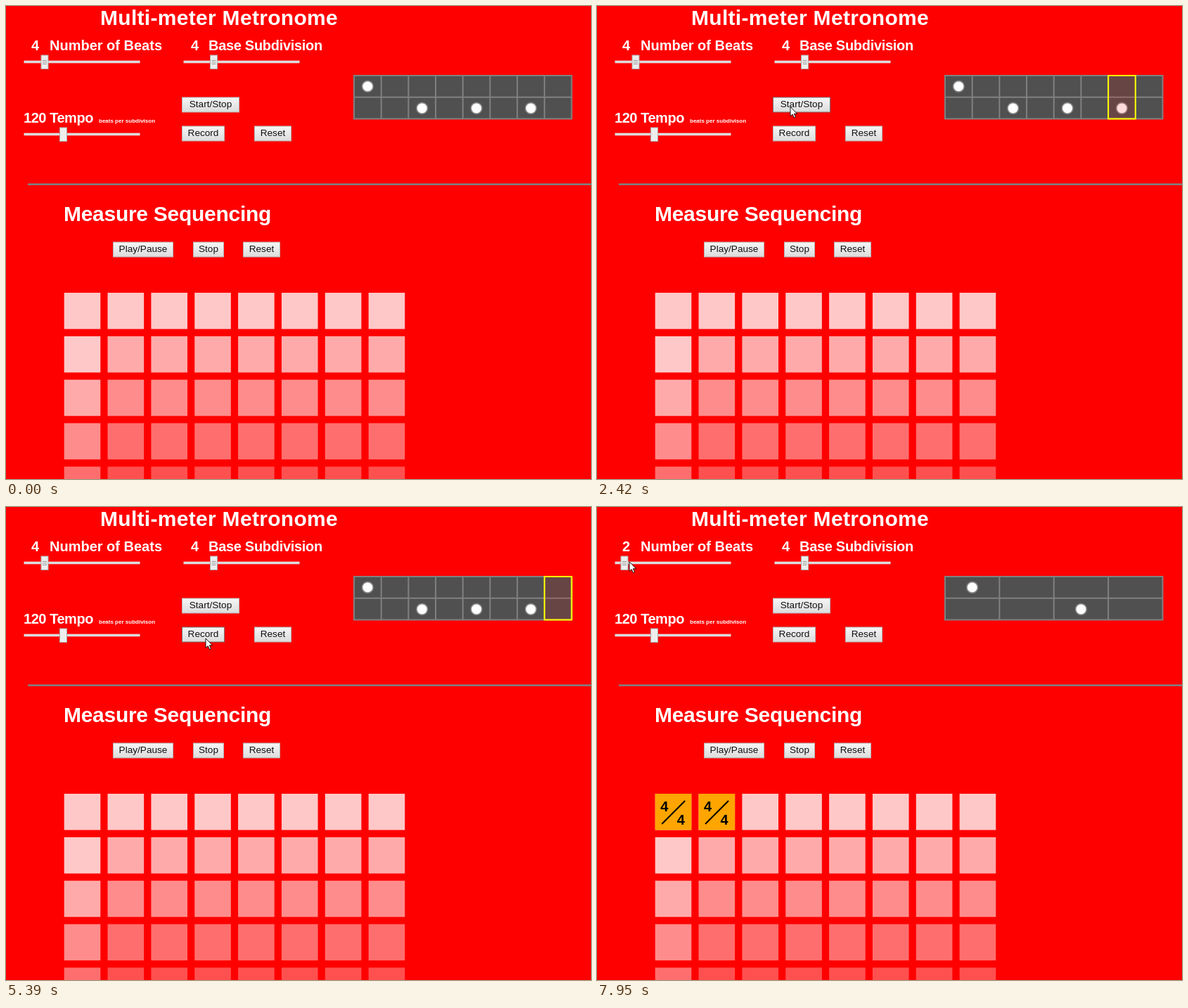
Write an HTML page that moves like this. It is 832 px wide and 673 px high and loops after 8000 ms.

```html
<!DOCTYPE html>
<html lang="en">
<head>
<meta charset="utf-8">
<title>Multi-meter Metronome</title>
<style>
  html, body { margin: 0; width: 100%; height: 100%; overflow: hidden; background: #f00; }
  svg { display: block; width: 832px; height: 673px; }
  text { font-family: "Liberation Sans", Arial, sans-serif; white-space: pre; }
  .head { font-weight: bold; fill: #fff; }
  .btn rect { fill: url(#face); stroke: #b4b4b4; }
  .btn.hover rect { stroke: #777; }
  .btn text { font-size: 13.6px; text-anchor: middle; fill: #111; }
</style>
</head>
<body>
<svg id="stage" viewBox="0 0 832 673">
  <defs>
    <linearGradient id="face" x2="0" y2="1">
      <stop stop-color="#f6f6f6"/><stop offset="1" stop-color="#dcdcdc"/>
    </linearGradient>
  </defs>
</svg>
<script>
const LOOP = 8000;
const stage = document.getElementById('stage');

function add(tag, attrs, parent = stage) {
  const el = document.createElementNS('http://www.w3.org/2000/svg', tag);
  for (const key in attrs) el.setAttribute(key, attrs[key]);
  parent.append(el);
  return el;
}

function rect(x, y, width, height, fill, parent) {
  return add('rect', { x, y, width, height, fill }, parent);
}

function label(str, x, y, size, spacing = 0, parent = stage) {
  const el = add('text', { class: 'head', x, y, 'font-size': size, 'letter-spacing': spacing }, parent);
  el.textContent = str;
  return el;
}

function button(str, x, y, w) {
  const g = add('g', { class: 'btn' });
  add('rect', { x: x + .5, y: y + .5, width: w - 1, height: 21 }, g);
  add('text', { x: x + w / 2, y: y + 14.6 }, g).textContent = str;
  return { g, x, y, w };
}

// Returns the handle, drawn around x = 0 so it can be moved by a transform.
function slider(x, y, pos, grip) {
  rect(x, y - 1.8, 165, 3.6, '#ddd');
  const g = add('g', { transform: `translate(${pos} ${y})` });
  add('rect', { x: -5, y: -9.5, width: 10, height: 19.5, fill: '#eee', stroke: '#aaa' }, g);
  if (grip) for (const dy of [-2.5, 0, 2.5]) rect(-3, dy, 6, 1, '#999', g);
  return g;
}

rect(0, 0, 832, 673, '#f00');
label('Multi-meter Metronome', 134, 27, 30, .3);
const beatText = label('4', 36, 63, 20);
label('Number of Beats', 62, 63, 20);
label('4', 263, 63, 20);
label('Base Subdivision', 288, 63, 20, -.3);
label('120 Tempo', 25, 166, 20, -.45);
label('beats per subdivison', 132, 165.5, 8);
label('Measure Sequencing', 82, 305.5, 30, -.28);

const beatHandle = slider(25.5, 79.5, 55, true);
slider(252.5, 79.5, 295.5, true);
slider(25.5, 182.5, 81.5, false);

const buttons = [
  button('Start/Stop', 250, 129.5, 82),
  button('Record', 250, 170.5, 61),
  button('Reset', 353, 170.5, 53),
  button('Play/Pause', 152, 335.5, 86),
  button('Stop', 266, 335.5, 44),
  button('Reset', 337, 335.5, 53)
];

rect(31, 252.4, 801, 2.6, '#808080');

// Sequencer squares fade toward red, one shade per eight squares.
const SQ = 51.6, PITCH = 61.85;
for (let i = 0; i < 40; i++) {
  const shade = 200 - 30 * Math.max(0, Math.floor((i - 1) / 8));
  rect(82.7 + i % 8 * PITCH, 408 + Math.floor(i / 8) * PITCH, SQ, SQ, `rgb(255,${shade},${shade})`);
}

function measure(i) {
  const g = add('g', { transform: `translate(${82.7 + i * PITCH} 408)` });
  rect(0, 0, SQ, SQ, '#ffa500', g);
  add('path', { d: 'M9.5 43L42.5 10', stroke: '#000', 'stroke-width': 2 }, g);
  for (const [x, y] of [[7.5, 25], [31, 43.5]]) label('4', x, y, 20, 0, g).style.fill = '#000';
  return g;
}
const recorded = [measure(0), measure(1)];

const GX = 495, GY = 99, GW = 309.5, GH = 61.5;
function beatGrid(beats) {
  const g = add('g', {});
  const cols = beats * 2, cw = GW / cols;
  add('rect', { x: GX, y: GY, width: GW, height: GH, fill: '#505050', stroke: '#808080', 'stroke-width': 2 }, g);
  let d = `M${GX} ${GY + GH / 2}h${GW}`;
  for (let c = 1; c < cols; c++) d += `M${GX + c * cw} ${GY}v${GH}`;
  add('path', { d, stroke: '#808080', 'stroke-width': 2 }, g);
  for (let b = 0; b < beats; b++) {
    add('circle', {
      cx: GX + (2 * b + .5) * cw, cy: GY + GH * (b ? .755 : .25), r: 7.8,
      fill: '#fff', stroke: '#888', 'stroke-width': 1.6
    }, g);
  }
  return g;
}
const grids = { 2: beatGrid(2), 3: beatGrid(3), 4: beatGrid(4) };
const column = add('rect', {
  y: GY, width: GW / 8, height: GH, fill: 'rgba(255,0,0,.137)', stroke: '#ff0', 'stroke-width': 2
});

const spot = add('circle', { r: 10, fill: 'rgba(230,220,30,.7)' });
const pointer = add('path', {
  d: 'M0 0V13.5L3.2 10.6L5.3 15.6L7.5 14.7L5.4 9.8H9.6Z',
  fill: '#fff', stroke: '#000', 'stroke-width': .9
});

// Pointer legs: first step, last step, number of steps, end point.
const legs = [
  [310, 420, 2, 330, 74], [530, 640, 2, 274, 131],
  [1750, 1980, 3, 275, 143.5], [5060, 5280, 3, 284, 187],
  [6060, 6290, 3, 186, 134], [6400, 6730, 4, 26, 58],
  [6850, 6960, 2, 54, 75], [7070, 7630, 6, 39, 74], [7730, 7950, 3, 46, 78]
];
const presses = [[860, 1300], [4730, 4950], [5510, 5730], [5950, 6060], [6960, 7730]];
const ticks = [970, 1190, 1420, 1640, 1860, 2200, 2420, 2640,
  2860, 3080, 3310, 3620, 3840, 4060, 4290, 4510];

function pointerAt(t) {
  let x = 446, y = 317;
  for (const [from, to, n, ex, ey] of legs) {
    if (t < from) break;
    const gap = (to - from) / (n - 1);
    const p = Math.min(n, Math.floor((t - from + 5) / gap) + 1) / n;
    x += (ex - x) * p;
    y += (ey - y) * p;
  }
  return [x, y];
}

const show = (el, on) => el.setAttribute('visibility', on ? 'visible' : 'hidden');

function draw(t) {
  const [x, y] = pointerAt(t);
  show(pointer, t >= 200);
  pointer.setAttribute('transform', `translate(${x} ${y})`);
  show(spot, presses.some(([a, b]) => t >= a && t < b));
  spot.setAttribute('cx', x);
  spot.setAttribute('cy', y);
  for (const b of buttons) {
    const over = t >= 200 && x >= b.x && x <= b.x + b.w && y >= b.y && y <= b.y + 22;
    b.g.classList.toggle('hover', over);
  }

  const beats = t < 7180 ? 4 : t < 7410 ? 3 : 2;
  beatText.textContent = beats;
  beatHandle.setAttribute('transform', `translate(${23 + beats * 8} 79.5)`);
  for (const n in grids) show(grids[n], +n === beats);

  const tick = ticks.filter(at => at <= t).length - 1;
  show(column, tick >= 0 && beats === 4);
  column.setAttribute('x', GX + Math.max(0, tick) % 8 * GW / 8);

  show(recorded[0], t >= 5510);
  show(recorded[1], t >= 5950);
}

const start = performance.now();
function frame() {
  draw((performance.now() - start) % LOOP);
  requestAnimationFrame(frame);
}
frame();
</script>
</body>
</html>
```
